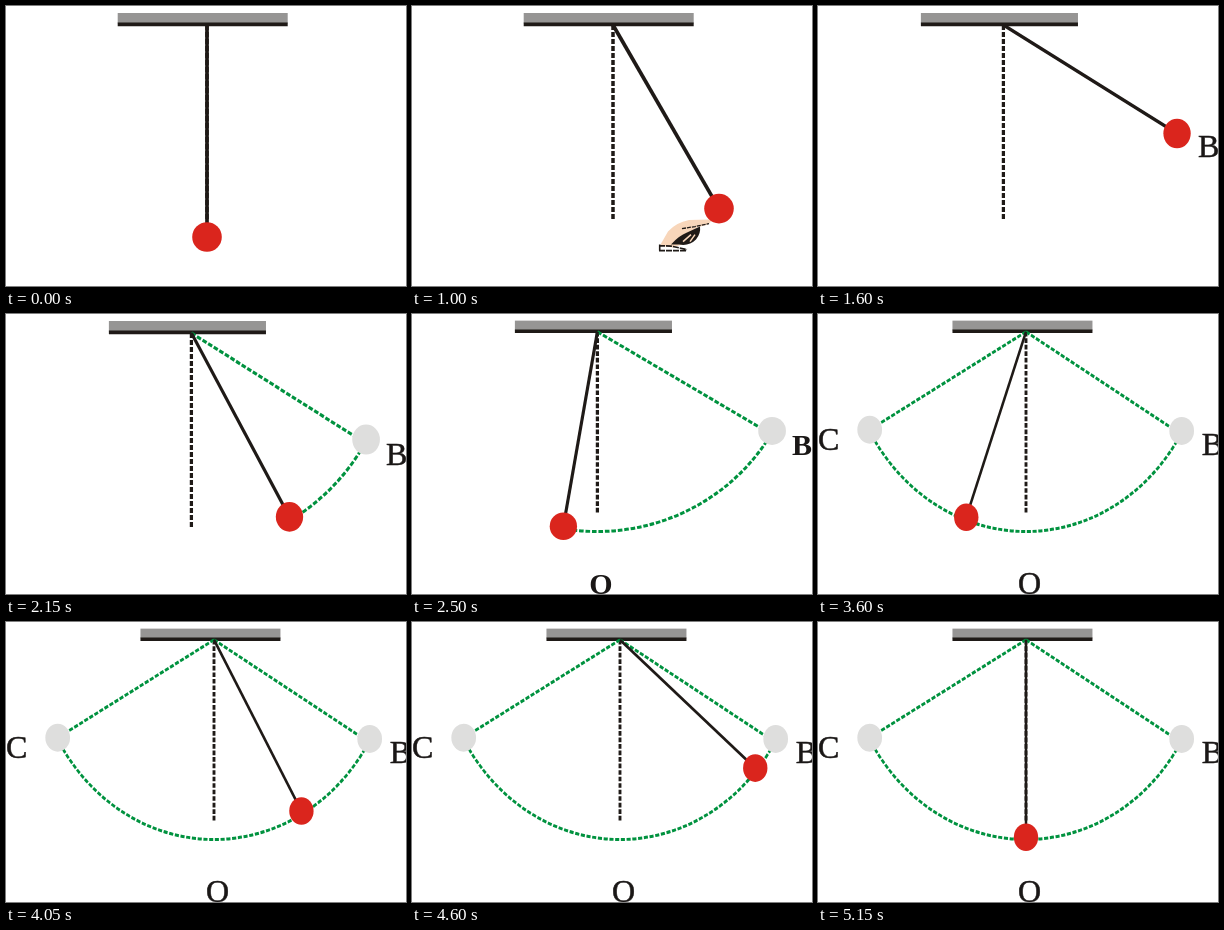
These frames come from a looping animation (400 by 280 pixels, 5200 ms). An HTML page:

```html
<!DOCTYPE html>
<html lang="en">
<head>
<meta charset="utf-8">
<title>Pendulum</title>
<style>
  html, body { margin: 0; width: 100%; height: 100%; overflow: hidden; background: #fff; }
  svg { display: block; width: 400px; height: 280px; }
  text { font: 32px "Liberation Serif", serif; fill: #1a1716; stroke: #1a1716; stroke-width: .5; }
  .bold { font-weight: 700; font-size: 30px; stroke: none; }
  .ink { stroke: #1f1a17; fill: none; }
  .green { stroke: #00923f; stroke-width: 3.2; stroke-dasharray: 5 2; fill: none; }
  .rest { fill: #dededd; }
</style>
</head>
<body>
<svg viewBox="0 0 400 280">
  <g id="scene">
    <rect x="-89.3" y="-12" width="170" height="10.5" fill="#969594"/>
    <path class="ink" d="M-89.3 -.6H80.7" stroke-width="3.6"/>
    <path class="ink" d="M0 0V196" stroke-width="3.5" stroke-dasharray="5 2"/>
    <path id="guides" class="green"/>
    <path id="arc" class="green"/>
    <circle id="ballB" class="rest" r="15"/>
    <circle id="ballC" class="rest" r="15"/>
    <g id="hand">
      <path d="M1 28L9 14Q17 5 30 2.5L50 2Q54 4 49 7L38 10Q30 18 26 26L14 30Z" fill="#f8d6ba"/>
      <path d="M12 27Q20 18 28 15L41 9Q42 16 37 22Q30 29 20 27Z" fill="#1f1a17"/>
      <path d="M24 24L32 17M31 24L36 17" stroke="#f8d6ba" stroke-width="1.5"/>
      <path class="ink" d="M23 11L36 9L50 6" stroke-width="1.3" stroke-dasharray="4 1"/>
      <path class="ink" d="M0 28L12 28.5L28 32M0 33H28M.7 27V33" stroke-width="1.6" stroke-dasharray="6 1"/>
    </g>
    <path id="string" class="ink"/>
    <circle id="bob" r="14.8" fill="#da251d"/>
  </g>
  <text id="textB">B</text>
  <text id="textC" x="0" y="135.5">C</text>
  <text id="textO" y="279.5" text-anchor="middle">O</text>
</svg>
<script>
const LOOP = 5200, PUSH = 500, RELEASE = 1600;
const LENGTH = 212, REST_LENGTH = 217, EDGE_B = 60.6, EDGE_C = -61, STEP = 10, TOP = 60;
const $ = id => document.getElementById(id);

// Each view squeezes the drawing so that the new labels fit.
const VIEWS = [
  { x: 201, y: 19, sx: 1, sy: 1 },
  { x: 185.4, y: 19, sx: .924, sy: 1 },
  { x: 185.4, y: 17.8, sx: .924, sy: .931 },
  { x: 208, y: 17.8, sx: .8235, sy: .931 }
];

// The bob lingers near the turning points and passes the middle quickly.
const swingHold = angle => {
  const size = Math.abs(angle);
  return size === 0 ? 50 : Math.max(100, 50 * (size / STEP - 2));
};
const firstHold = angle => 50 * Math.ceil(.39 + .06 * angle);
const pushHold = angle => angle === 0 ? 800 : angle === TOP ? 300 : 100;

const poses = [];
let clock = 0, view = 0;
function swing(from, to, holdOf) {
  const step = Math.sign(to - from) * STEP;
  for (let angle = from; angle !== to + step; angle += step) {
    poses.push({ start: clock, angle, view });
    clock += holdOf(angle);
  }
}
swing(0, TOP, pushHold);
view = 1;
swing(TOP, STEP, firstHold);
view = 2;
swing(0, -TOP, swingHold);
view = 3;
swing(-TOP + STEP, TOP, swingHold);
swing(TOP - STEP, 0, swingHold);

const polar = (deg, rx, ry = rx) => {
  const a = deg * Math.PI / 180;
  return [rx * Math.sin(a), ry * Math.cos(a)];
};
const set = (el, attrs) => Object.entries(attrs).forEach(([key, value]) => el.setAttribute(key, value));
const show = (id, on) => set($(id), { display: on ? 'inline' : 'none' });
const placeBall = (id, [cx, cy]) => set($(id), { cx, cy });
const ray = deg => `M0 0L${polar(deg, REST_LENGTH)}`;
const onArc = deg => polar(deg, 219, 214.5);

placeBall('ballB', polar(EDGE_B, REST_LENGTH));
placeBall('ballC', polar(EDGE_C, REST_LENGTH));

function drawLabels(index, { x, y, sx, sy }) {
  ['textB', 'textO', 'textC'].forEach((id, i) => {
    show(id, index > i);
    $(id).classList.toggle('bold', index === 2);
  });
  set($('textB'), { x: x + 189 * sx + 20, y: y + 132 * sy });
  set($('textO'), { x: x + 3.5 });
}

function draw(t) {
  const { angle, view: index } = poses.findLast(pose => pose.start <= t);
  const view = VIEWS[index], full = index === 3;
  const stretch = index ? 5 * (angle / TOP) ** 4 : 0;
  const bob = polar(angle, LENGTH + stretch);
  set($('scene'), { transform: `translate(${view.x} ${view.y}) scale(${view.sx} ${view.sy})` });
  placeBall('bob', bob);
  set($('string'), { d: `M0 0L${bob}`, 'stroke-width': 3.7 * view.sx });

  const released = index > 0 && t >= RELEASE + 200;
  for (const id of ['guides', 'arc', 'ballB']) show(id, released);
  show('ballC', full);
  set($('guides'), { d: ray(EDGE_B - .9) + (full ? ray(EDGE_C) : '') });
  set($('arc'), { d: `M${onArc(EDGE_B)}A219 214.5 0 0 1 ${onArc(full ? EDGE_C : angle)}` });

  show('hand', t >= PUSH && t < RELEASE);
  const push = angle / 30;
  set($('hand'), { transform: `translate(${bob[0] - 68 + 8 * push} ${bob[1] - 2 + 11 * push})` });
  drawLabels(index, view);
}

const start = performance.now();
function tick() {
  draw((performance.now() - start) % LOOP);
  requestAnimationFrame(tick);
}
tick();
</script>
</body>
</html>
```
